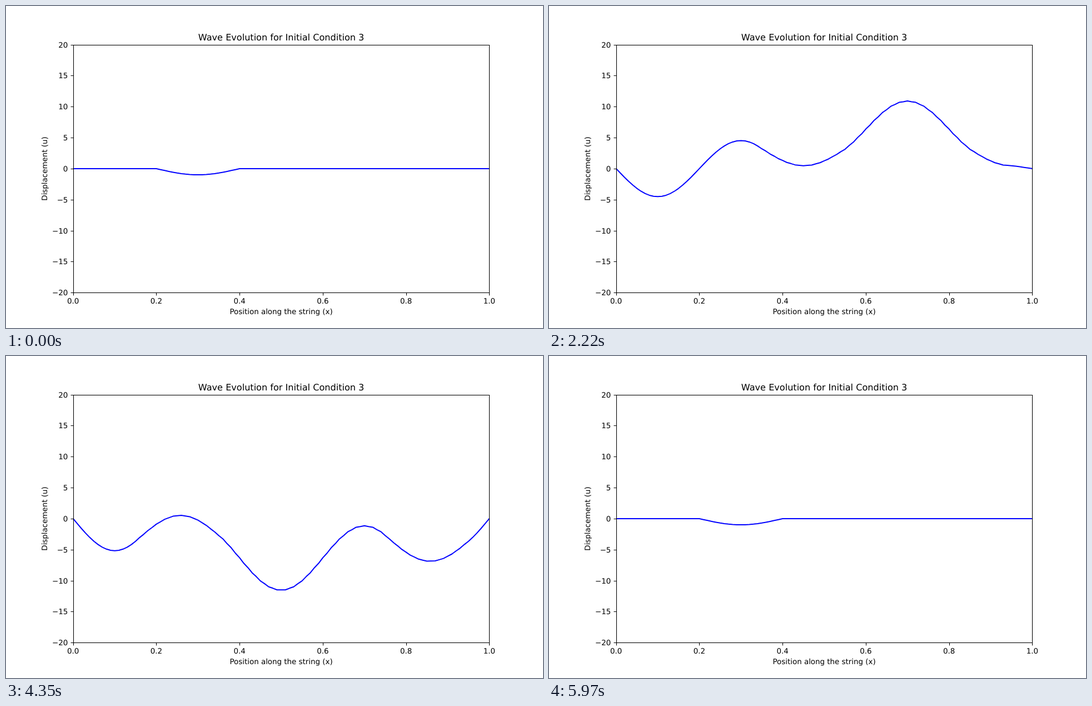
Write an HTML page that moves like this. It is 966 by 580 pixels and loops after 6 s.

```html
<!DOCTYPE html>
<html lang="en">
<head>
<meta charset="utf-8">
<title>Wave Evolution</title>
<style>
  html, body { margin: 0; width: 100%; height: 100%; overflow: hidden; background: #fff; }
  svg { display: block; }
  text {
    font: 13.42px "DejaVu Sans", sans-serif;
    text-anchor: middle;
    text-rendering: geometricPrecision;
  }
  .title { font-size: 16.1px; }
  .end { text-anchor: end; }
  .axis { fill: none; stroke: #000; stroke-width: 1.07; }
  #wave { fill: none; stroke: #00f; stroke-width: 2.01; stroke-linejoin: round; stroke-linecap: square; }
</style>
</head>
<body>
<svg width="966" height="580" viewBox="0 0 966 580">
  <clipPath id="plot"><rect x="120.75" y="69.6" width="748.65" height="446.6"/></clipPath>
  <path id="wave" clip-path="url(#plot)"/>
  <rect class="axis" x="121.5" y="70.5" width="748" height="446"/>
  <path id="ticks" class="axis"/>
  <g id="labels"></g>
  <text class="title" x="495.1" y="62">Wave Evolution for Initial Condition 3</text>
  <text x="495.1" y="555">Position along the string (x)</text>
  <text transform="translate(74 293) rotate(-90)">Displacement (u)</text>
</svg>
<script>
const FRAMES = 200, FRAME_MS = 30, CELLS = 100;
const byId = id => document.getElementById(id);
const px = x => 120.75 + 748.65 * x;
const py = u => 292.9 - 11.165 * u;
const snap = v => Math.floor(v + 0.5) + 0.5;

function addLabel(text, x, y, cls = '') {
  const el = document.createElementNS('http://www.w3.org/2000/svg', 'text');
  el.setAttribute('x', x);
  el.setAttribute('y', y);
  el.setAttribute('class', cls);
  el.textContent = text;
  byId('labels').append(el);
}

function drawAxes() {
  let d = '';
  for (let k = 0; k <= 5; k++) {
    const x = px(k / 5);
    d += `M${snap(x)} 516.5v5`;
    addLabel((k / 5).toFixed(1), x, 536.4);
  }
  for (let u = -20; u <= 20; u += 5) {
    const y = py(u);
    d += `M121.5 ${snap(y)}h-5`;
    addLabel(String(u).replace('-', '\u2212'), 111.4, Math.round(y + 5), 'end');
  }
  byId('ticks').setAttribute('d', d);
}

// Leapfrog wave equation with unit Courant number and fixed ends.
function simulate() {
  const sine = Array.from({ length: CELLS + 1 }, (_, i) => Math.sin(Math.PI * i / 20));
  const dip = sine.map((s, i) => (i > 20 && i < 40 ? s : 0));
  const steps = [dip, sine];
  for (let n = 1; n < FRAMES; n++) {
    const [prev, now] = [steps[n - 1], steps[n]];
    steps.push(now.map((_, i) =>
      i % CELLS === 0 ? 0 : now[i - 1] + now[i + 1] - prev[i]));
  }
  return steps;
}

const toPath = u => 'M' + u.map((v, i) => `${px(i / CELLS).toFixed(2)} ${py(v).toFixed(2)}`).join('L');

// The first step is never shown: the display goes from step 0 to step 2.
const paths = simulate().filter((_, n) => n !== 1).map(toPath);

let shown = -1;
function draw() {
  const frame = Math.floor(performance.now() / FRAME_MS) % FRAMES;
  if (frame !== shown) byId('wave').setAttribute('d', paths[frame]);
  shown = frame;
  requestAnimationFrame(draw);
}

drawAxes();
draw();
</script>
</body>
</html>
```
